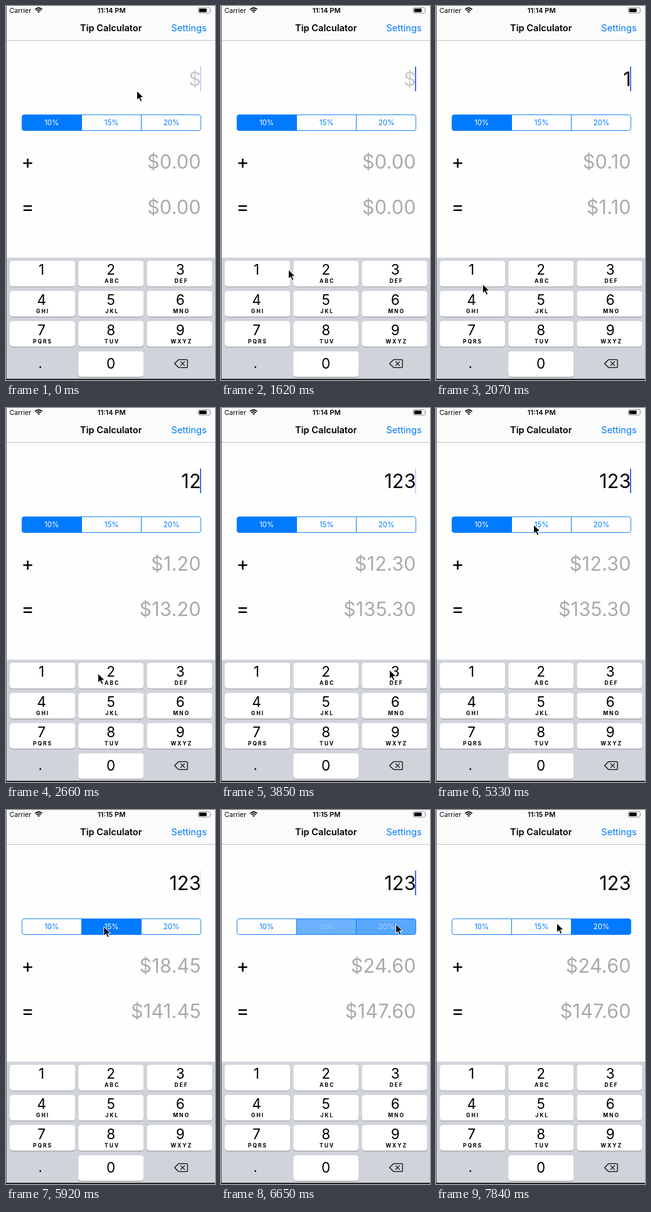
Write an HTML page that moves like this. It is 333 px wide and 593 px high and loops after 7.99 s.

```html
<!DOCTYPE html>
<html lang="en">
<head>
<meta charset="utf-8">
<title>Tip Calculator</title>
<style>
  html, body { margin: 0; width: 100%; height: 100%; overflow: hidden; background: #fefefe; }
  svg { display: block; width: 333px; height: 593px; font-family: Inter, "Liberation Sans", sans-serif; }
</style>
</head>
<body>
<svg id="stage" viewBox="0 0 333 593" xmlns="http://www.w3.org/2000/svg"></svg>
<script>
const BLUE = '#007aff';
const LOOP = 7990;
const STEP = 148;
const stage = document.getElementById('stage');

function add(tag, attrs, content) {
  const el = document.createElementNS('http://www.w3.org/2000/svg', tag);
  for (const k in attrs) el.setAttribute(k, attrs[k]);
  if (content !== undefined) el.textContent = content;
  return stage.appendChild(el);
}
const rect = (x, y, width, height, fill, more) => add('rect', { x, y, width, height, fill, ...more });
const path = (d, more) => add('path', { d, fill: 'none', ...more });
const text = (str, x, y, size, anchor, more) =>
  add('text', { x, y, 'font-size': size, 'text-anchor': anchor, ...more }, str);
const amount = (y, fill) => text('', 310.8, y, 30.5, 'end', { fill, 'letter-spacing': .25 });

// Page and navigation bar
rect(0, 0, 333, 593, '#fefefe');
rect(0, 0, 333, 54, '#fbfbfb');
rect(0, 54, 333, 1, '#c4c4c6');
text('Carrier', 5.5, 11, 10.6, 'start');
const clock = text('', 168.2, 11, 11, 'middle', { 'font-weight': 600 });
text('Tip Calculator', 167.3, 40, 14.6, 'middle', { 'font-weight': 600 });
text('Settings', 319.8, 40, 14.7, 'end', { fill: BLUE });

// Wi-Fi and battery
path('M46.4 5.4Q52 .6 57.6 5.4M48.5 7.5Q52 4.6 55.5 7.5', { stroke: '#000', 'stroke-width': 1.7 });
path('M52 11L50 8.9Q52 7.4 54 8.9Z', { fill: '#000' });
rect(306.2, 2.5, 19, 8.8, 'none', { rx: 2.2, stroke: '#8a8a8a', 'stroke-width': .9 });
rect(307.7, 4, 12, 5.8, '#000', { rx: 1 });
path('M326.4 5.3Q328 6.9 326.4 8.5Z', { fill: '#8a8a8a' });

// Amounts
const bill = amount(127);
const tip = amount(258, '#aaa');
const total = amount(330, '#aaa');
text('+', 34.7, 257.7, 30.5, 'middle');
text('=', 34.7, 329.4, 30.5, 'middle');
const caret = rect(309, 96, 2, 39, '#426bf2');

// Segmented control
const shapes = [
  'M120.5 172.5H29a3.5 3.5 0 0 0-3.5 3.5v18a3.5 3.5 0 0 0 3.5 3.5H120.5Z',
  'M120.5 172.5H215.5V197.5H120.5Z',
  'M215.5 172.5H307a3.5 3.5 0 0 1 3.5 3.5v18a3.5 3.5 0 0 1-3.5 3.5H215.5Z'
];
const segments = shapes.map((d, i) => ({
  fill: path(d, { fill: BLUE, stroke: 'none' }),
  label: text(`${10 + 5 * i}%`, 72.8 + 95.4 * i, 189, 11.5, 'middle')
}));
path(shapes.join(''), { stroke: BLUE, 'stroke-width': .9 });

// Keypad
rect(0, 399, 333, 194, '#d0d3d9');
const letters = ['', 'ABC', 'DEF', 'GHI', 'JKL', 'MNO', 'PQRS', 'TUV', 'WXYZ'];
function key(digit, col, row, sub) {
  const x = 6 + col * 109.2, y = 404 + row * 47.8, mid = 56.7 + col * 110.5;
  rect(x, y + .9, 104.2, 40.7, '#8b8d92', { rx: 4.5 });
  const face = rect(x, y, 104.2, 40.7, '#fff', { rx: 4.5 });
  text(digit, mid, y + (sub === undefined ? 27.6 : 22.4), 22.5, 'middle');
  if (sub) text(sub, mid + 1.9, y + 35, 8.6, 'middle', { 'font-weight': 700, 'letter-spacing': 1.9 });
  return face;
}
const faces = letters.map((sub, i) => key(i + 1, i % 3, Math.floor(i / 3), sub));
key(0, 1, 3);
text('.', 54.7, 573.5, 22.5, 'middle');
path('M268.6 567L274.4 561.2Q275 560.6 276 560.6H287.3Q289.2 560.6 289.2 562.5V571.5Q289.2 573.4 287.3 573.4H276Q275 573.4 274.4 572.8Z' +
  'M278.3 563.9L284.5 570.1M284.5 563.9L278.3 570.1',
  { stroke: '#111', 'stroke-width': 1.3, 'stroke-linejoin': 'round', 'stroke-linecap': 'round' });

// Window edge
rect(0, 0, 1, 593, '#555');
rect(0, 591, 333, 2, '#26272a');

const mouse = path('M0 0V14.6L3.4 11.5L5.8 17L8.3 15.9L5.9 10.5H10.6Z',
  { fill: '#000', stroke: '#fff', 'stroke-width': 1, 'stroke-linejoin': 'round' });

const clamp = v => Math.min(1, Math.max(0, v));
const ease = v => v * v * (3 - 2 * v);
const money = n => '$' + n.toFixed(2);
const tint = a => `rgb(${Math.round(255 * a)},${Math.round(122 + 133 * a)},255)`;

// Pointer stops: arrival time, x, y
const MOVE = 300;
const stops = [
  [0, 208.5, 134.5], [150, 211, 143], [1620, 107.5, 418], [1920, 74, 441], [2360, 146.5, 421],
  [2960, 268.5, 415], [4140, 205, 465], [4740, 117, 200], [5330, 155.5, 185],
  [6210, 278.5, 181], [7840, 192.5, 179.5]
];
function pointer(t) {
  let [from, x, y] = stops[0];
  for (const [end, nx, ny] of stops.slice(1)) {
    const k = ease(clamp(1 - (end - t) / Math.min(MOVE, end - from)));
    x += (nx - x) * k;
    y += (ny - y) * k;
    from = end;
  }
  return [x, y];
}

// Keys 1, 2, 3 are typed at an even pace
const TYPE_START = 1480, TYPE_GAP = 590, FIRST_KEY = TYPE_START + TYPE_GAP;
const typedCount = t => Math.min(3, Math.max(0, Math.floor((t - TYPE_START) / TYPE_GAP)));

// The caret blinks anew after each key: solid, then a faint tail
function blink(t, count) {
  const phase = (t - (count ? TYPE_START + TYPE_GAP * count : -600)) % 960;
  return phase < 590 ? 1 : .3 * clamp(1 - (phase - 600) / 280);
}

// Progress of the change to segment i
const chosen = (i, t) => i === 0 ? 1 : i > 2 ? 0 : clamp((t - 5620 - 890 * (i - 1)) / 230);

function draw(t) {
  mouse.setAttribute('transform', `translate(${pointer(t).join(' ')})`);

  const count = typedCount(t), typed = '123'.slice(0, count);
  caret.setAttribute('opacity', blink(t, count));
  bill.textContent = typed || '$';
  bill.setAttribute('fill', typed ? '#000' : '#c7c7cd');
  faces[0].setAttribute('fill', t < FIRST_KEY && t > FIRST_KEY - 160 ? '#bcc0c9' : '#fff');

  let rate = .05;
  segments.forEach(({ fill, label }, i) => {
    const k = chosen(i, t), a = k * (1 - chosen(i + 1, t) ** 2);
    fill.setAttribute('fill-opacity', a);
    label.setAttribute('fill', tint(a));
    if (k > .5) rate += .05;
  });
  tip.textContent = money(typed * rate);
  total.textContent = money(typed * (1 + rate));
  clock.textContent = t < 5900 ? '11:14 PM' : '11:15 PM';
}

const start = performance.now();
function tick() {
  const t = (performance.now() - start) % LOOP;
  draw(Math.min(Math.floor((t + 10) / STEP), 53) * STEP);
  requestAnimationFrame(tick);
}
tick();
</script>
</body>
</html>
```
